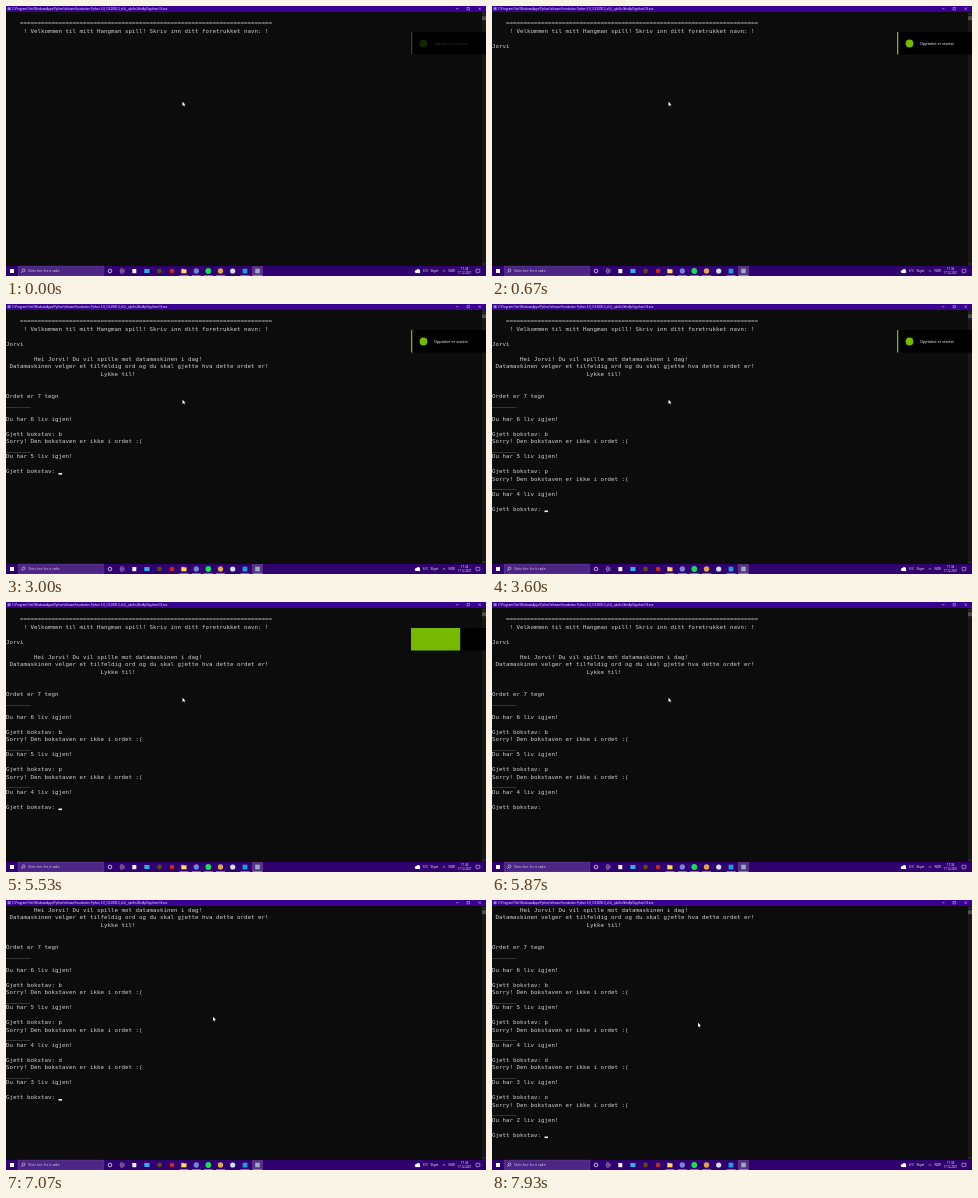
Write an HTML page with a canvas that moves like this. It is 480 by 270 pixels and loops after 8 s.

```html
<!DOCTYPE html>
<html lang="no">
<head>
<meta charset="utf-8">
<title>Hangman</title>
<style>
html, body { margin: 0; width: 100%; height: 100%; overflow: hidden; background: #0c0c0c; }
canvas { display: block; }
</style>
</head>
<body>
<canvas id="stage" width="480" height="270"></canvas>
<script>
const ctx = document.getElementById('stage').getContext('2d');
const LOOP = 8000, TOP = 6, ROW = 7.5, COL = 3.5;
const MONO = '"DejaVu Sans Mono", monospace', SANS = '"Open Sans", sans-serif';
const PLAYER = 'Jorvi', PROMPT = 'Gjett bokstav: ', BLANKS = '_______';

// Each guess: time the prompt appears, letter, time the letter is typed
const guesses = [[900, 'b', 2470], [2600, 'p', 3330], [3550, 'd', 6130], [6330, 'o', 7730], [7870, '', LOOP]];
const caretOff = [[0, 870], [1400, 1930], [2470, 2600], [4600, 5130], [5660, 6200], [6330, 6800], [7270, 7800]];
const mousePath = [[6770, 176.5, 95.7], [6930, 207.5, 111.7], [7070, 207, 116.7], [7270, 206, 122.7]];

const clamp = v => Math.max(0, Math.min(1, v));

function rect(x, y, w, h, color) {
  ctx.fillStyle = color;
  ctx.fillRect(x, y, w, h);
}

function disc(x, y, r, color) {
  ctx.fillStyle = color;
  ctx.beginPath();
  ctx.arc(x, y, r, 0, 7);
  ctx.fill();
}

function path(d, color, width = 0.5) {
  ctx.strokeStyle = color;
  ctx.lineWidth = width;
  ctx.stroke(new Path2D(d));
}

// Laid out at ten times the size so that small advances stay fractional
function text(str, x, y, size, color, font = SANS, align = 'left') {
  ctx.save();
  ctx.translate(x, y);
  ctx.scale(0.1, 0.1);
  ctx.font = `${size * 10}px ${font}`;
  ctx.textAlign = align;
  ctx.fillStyle = color;
  ctx.fillText(str, 0, 0);
  ctx.restore();
}

function print(row, str) {
  text(str, 0, TOP + row * ROW + 5.7, COL / 0.602, '#d0d0d0', MONO);
}

function terminal(t) {
  const scroll = t < 7000 ? 0 : t < 7065 ? 3 : 6;
  ctx.save();
  ctx.beginPath();
  ctx.rect(0, TOP, 476, 254);
  ctx.clip();
  ctx.translate(0, -scroll * ROW);

  print(1, ' '.repeat(4) + '='.repeat(72));
  print(2, '     ! Velkommen til mitt Hangman spill! Skriv inn ditt foretrukket navn: !');
  print(4, PLAYER.slice(0, Math.max(0, Math.floor((t - 20) / 110))));

  if (t >= 870) {
    print(6, ' '.repeat(8) + `Hei ${PLAYER}! Du vil spille mot datamaskinen i dag!`);
    print(7, ' Datamaskinen velger et tilfeldig ord og du skal gjette hva dette ordet er!');
    print(8, ' '.repeat(27) + 'Lykke til!');
    print(11, 'Ordet er 7 tegn');
    print(12, BLANKS);
  }

  let caret = [0, 4];
  guesses.forEach(([shown, letter, typed], i) => {
    if (t < shown) return;
    const row = 16 + i * 5;
    const line = PROMPT + (t >= typed ? letter : '');
    if (i) {
      print(row - 4, 'Sorry! Den bokstaven er ikke i ordet :(');
      print(row - 3, BLANKS);
    }
    print(row - 2, `Du har ${6 - i} liv igjen!`);
    print(row, line);
    caret = [line.length, row];
  });
  if (!caretOff.some(([from, to]) => t >= from && t < to))
    rect(caret[0] * COL, TOP + caret[1] * ROW + 5.5, COL, 1.6, '#f2f2f2');
  ctx.restore();
}

function notification(t) {
  const grow = clamp((t - 5440) / 140);
  const leave = clamp((t - 5600) / 260) ** 2;
  if (leave === 1) return;
  const x = 405 + 75 * leave;
  const fade = 0.2 + 0.8 * clamp(t / 550);
  rect(x, 26, 480 - x, 22.5, '#000');
  ctx.globalAlpha = 0.4 + 0.6 * clamp(t / 250);
  rect(x, 26, 1.3 + 73.7 * grow, 22.5, '#76b900');
  if (!grow) {
    ctx.globalAlpha = fade;
    disc(417.5, 37.5, 3.9, '#76b900');
    text('Opptaket er startet', 428, 39, 3.82, '#fff');
  }
  ctx.globalAlpha = 1;
}

function windowFrame() {
  rect(0, 0, 480, TOP, '#3a0091');
  rect(1.6, 1.2, 3, 3, '#7a8fc4');
  text('C:\\Program Files\\WindowsApps\\PythonSoftwareFoundation.Python.3.8_3.8.2800.0_x64__qbz5n2kfra8p0\\python3.8.exe',
    6, 3.7, 2.82, '#fff');
  path('M450 2.7h2.5M461 1.5h2.4v2.4h-2.4zM472.5 1.5l2.4 2.4m0-2.4l-2.4 2.4', '#fff', 0.4);
  rect(476, TOP, 4, 254, '#171717');
  rect(476, 10.2, 4, 4, '#4d4d4d');
  path('M477 8.6l1-1l1 1M477 257.6l1 1l1-1', '#888', 0.5);
}

function taskbar() {
  rect(0, 260, 480, 10, '#30006e');
  rect(4, 263, 4, 4, '#fff');
  rect(12, 260, 86, 10, '#4d2585');
  path('M12.2 260.2h85.6v9.6h-85.6z', '#67459a', 0.4);
  ctx.strokeStyle = '#fff';
  ctx.lineWidth = 0.5;
  ctx.beginPath();
  ctx.arc(17.5, 264.4, 1.4, 0, 7);
  ctx.stroke();
  path('M16.5 265.5l-1.3 1.3', '#fff');
  text('Skriv her for å søke', 22, 266.3, 3.55, '#d6cbe4');

  ctx.beginPath();
  ctx.arc(104, 265, 1.8, 0, 7);
  ctx.lineWidth = 0.7;
  ctx.stroke();
  path('M114.3 264h2.6v2h-2.6zM114.3 262.8h2.6M114.3 267.2h2.6M118 263v4', '#fff', 0.4);

  rect(246, 260, 11, 10, '#573184');
  rect(126.3, 263, 4, 4.2, '#f0f0f0');
  rect(138.3, 263, 5.2, 4, '#38a8e8');
  disc(153.5, 265, 2.4, '#59471f');
  disc(166, 265, 2.3, '#c72a20');
  rect(175.3, 262.8, 2.5, 1, '#e2a520');
  rect(175.3, 263.3, 5.2, 4, '#ffd867');
  disc(190.3, 265, 2.7, '#7582dc');
  disc(202.3, 265, 2.9, '#1ed760');
  disc(214.5, 265, 2.7, '#dfa45c');
  disc(226.7, 265, 2.6, '#d5deea');
  rect(236.6, 262.7, 4.8, 4.8, '#2597dc');
  rect(249.2, 262.7, 4.6, 4.6, '#9aa9c4');
  for (const x of [178, 190.3, 202.3, 214.5, 239, 251.5]) rect(x - 4.5, 269.3, 9, 0.7, '#b28be0');

  disc(410.3, 265.6, 1.5, '#fff');
  disc(412.2, 264.9, 1.9, '#fff');
  rect(410.3, 265.5, 3.8, 1.6, '#fff');
  text('6°C', 417, 266.3, 3.2, '#fff');
  text('Skyet', 424.5, 266.3, 3.2, '#fff');
  path('M436.7 265.6l1.3-1.3l1.3 1.3', '#fff');
  text('NOR', 442.5, 266.2, 3, '#fff');
  text('17.34', 458.5, 263.8, 2.9, '#fff', SANS, 'center');
  text('17.12.2021', 458.5, 268.4, 2.7, '#fff', SANS, 'center');
  path('M470 263.3h3.8v3h-1.5l-.9 1l-.3-1h-1.1z', '#fff', 0.45);
}

function mouse(t) {
  let [, x, y] = mousePath[0];
  for (let i = 1; i < mousePath.length; i++) {
    const [t0, x0, y0] = mousePath[i - 1], [t1, x1, y1] = mousePath[i];
    if (t < t0) break;
    const k = clamp((t - t0) / (t1 - t0));
    x = x0 + (x1 - x0) * k;
    y = y0 + (y1 - y0) * k;
  }
  ctx.fillStyle = '#fff';
  ctx.fill(new Path2D(`M${x} ${y}v4.2l1-.9l.7 1.5l.6-.3l-.7-1.5h1.4z`));
}

function draw() {
  const t = performance.now() % LOOP;
  rect(0, 0, 480, 270, '#0c0c0c');
  terminal(t);
  windowFrame();
  notification(t);
  taskbar();
  mouse(t);
  requestAnimationFrame(draw);
}
draw();
</script>
</body>
</html>
```
